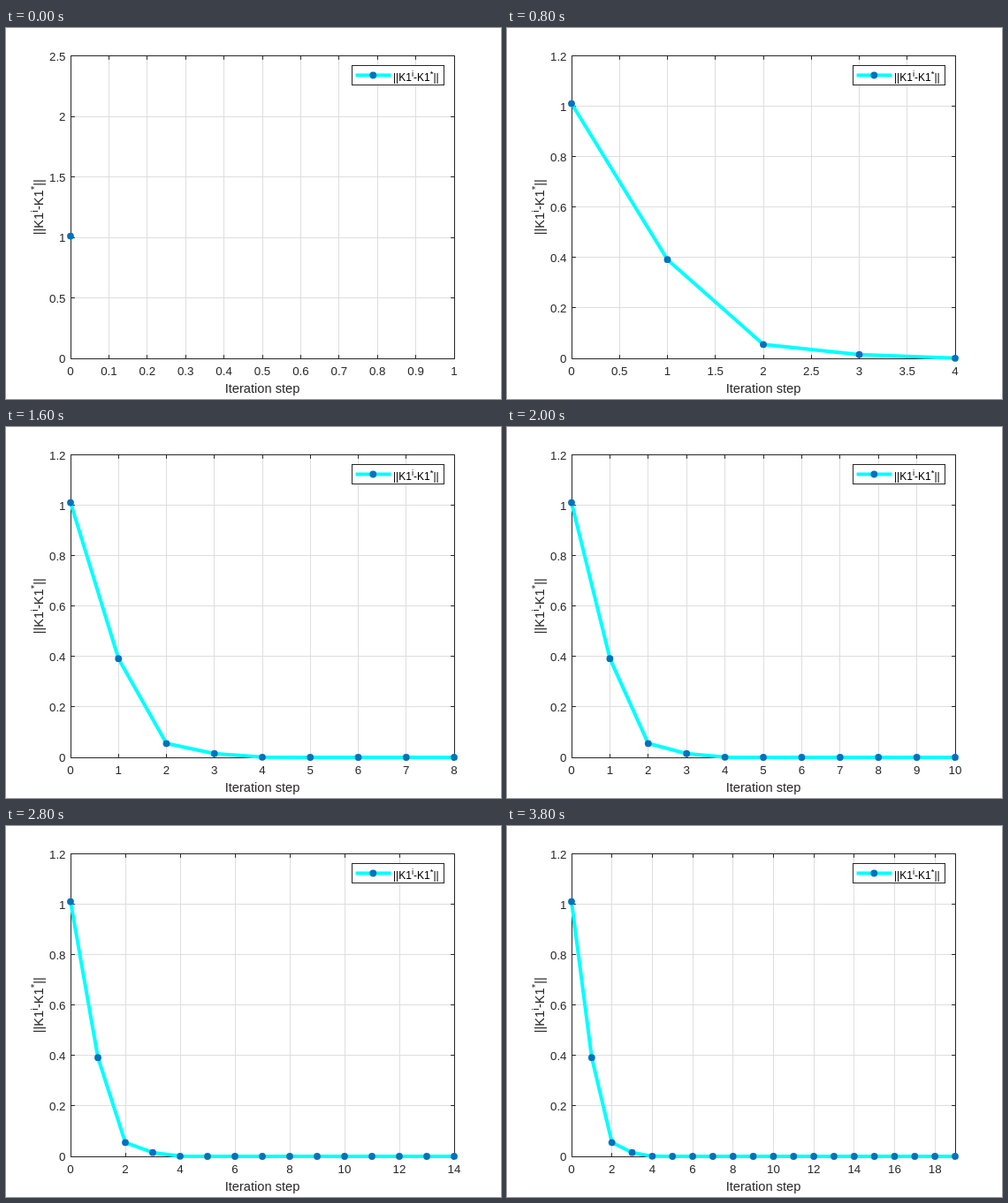
Write an HTML page that moves like this. It is 560x420 px and loops after 4 s.

```html
<!DOCTYPE html>
<html lang="en">
<head>
<meta charset="utf-8">
<title>Convergence plot</title>
<style>
  html, body { margin: 0; width: 100%; height: 100%; overflow: hidden; background: #fff; }
  svg { display: block; }
  text { font-family: "Liberation Sans", Arial, sans-serif; fill: #262626; }
  .tick { font-size: 13.33px; }
  .title { font-size: 14.67px; }
  .key { font-size: 12px; fill: #000; }
  .axis { stroke: #262626; fill: none; }
  .grid { stroke: #dedede; fill: none; }
  .curve { stroke: #0ff; stroke-width: 4; fill: none; stroke-linejoin: round; }
  .dot { fill: #0072bd; }
</style>
</head>
<body>
<svg width="560" height="420" viewBox="0 0 560 420">
  <g id="plot"></g>
  <text class="title" x="290" y="413" text-anchor="middle">Iteration step</text>
  <text class="title" transform="translate(41.5 202.7) rotate(-90)" text-anchor="middle">||K1<tspan dy="-6" font-size="11.7">i</tspan><tspan dy="6">-K1</tspan><tspan dy="-6" font-size="11.7">*</tspan><tspan dy="6">||</tspan></text>
  <rect class="axis" x="391.5" y="42.5" width="104" height="22" style="fill:#fff"/>
  <path class="curve" d="M395.5 53.5H435.5"/>
  <circle class="dot" cx="415.3" cy="53.5" r="3.9"/>
  <text class="key" x="438" y="60">||K1<tspan dy="-5" font-size="9.6">i</tspan><tspan dy="5">-K1</tspan><tspan dy="-5" font-size="9.6">*</tspan><tspan dy="5">||</tspan></text>
</svg>
<script>
const STEP_MS = 200, STEPS = 20;
const LEFT = 73, RIGHT = 507, TOP = 31.6, BOTTOM = 374;
const TICK = 4.4;
const ERRORS = [1.011, 0.392, 0.055, 0.015, 0.0005];
const plot = document.getElementById("plot");

const errorAt = i => ERRORS[i] ?? 0;
const crisp = v => Math.floor(v + 0.01) + 0.5;
const path = (cls, d) => `<path class="${cls}" d="${d}"/>`;
const label = (x, y, anchor, v) =>
  `<text class="tick" x="${x}" y="${y}" text-anchor="${anchor}">${+v.toFixed(1)}</text>`;

function xStep(max) {
  if (max <= 1) return 0.1;
  if (max <= 2) return 0.2;
  if (max <= 5) return 0.5;
  return max <= 11 ? 1 : 2;
}

// [low, high, tick spacing]
function yRange(n) {
  if (n === 0) return [0, 2.5, 0.5];
  if (n === 1) return [0.3, 1.1, 0.1];
  return [0, 1.2, 0.2];
}

function ticks(lo, hi, step) {
  const count = Math.floor((hi - lo) / step + 1e-6);
  return Array.from({ length: count + 1 }, (_, i) => lo + i * step);
}

function draw(n) {
  const xMax = Math.max(1, n);
  const [yLo, yHi, yGap] = yRange(n);
  const px = v => LEFT + (RIGHT - LEFT) * v / xMax;
  const py = v => BOTTOM - (BOTTOM - TOP) * (v - yLo) / (yHi - yLo);
  const l = crisp(LEFT), r = crisp(RIGHT), t = crisp(TOP), b = crisp(BOTTOM);
  let grid = "", axis = `M${l} ${t}H${r}V${b}H${l}Z`, labels = "";

  for (const v of ticks(0, xMax, xStep(xMax))) {
    const x = crisp(px(v));
    grid += `M${x} ${t}V${b}`;
    axis += `M${x} ${b}v${-TICK}M${x} ${t}v${TICK}`;
    labels += label(px(v), 393, "middle", v);
  }
  for (const v of ticks(yLo, yHi, yGap)) {
    const y = crisp(py(v));
    grid += `M${l} ${y}H${r}`;
    axis += `M${l} ${y}h${TICK}M${r} ${y}h${-TICK}`;
    labels += label(67.5, py(v) + 5, "end", v);
  }

  const points = Array.from({ length: n + 1 }, (_, i) => [px(i), py(errorAt(i))]);
  const dots = points.map(([x, y]) => `<circle class="dot" cx="${x}" cy="${y}" r="3.9"/>`);
  const curve = n ? path("curve", "M" + points.join("L")) : "";
  plot.innerHTML = path("grid", grid) + path("axis", axis) + labels + curve + dots.join("");
}

let shown = -1;
function tick() {
  const n = Math.floor(performance.now() / STEP_MS) % STEPS;
  if (n !== shown) draw(shown = n);
  requestAnimationFrame(tick);
}
tick();
</script>
</body>
</html>
```
